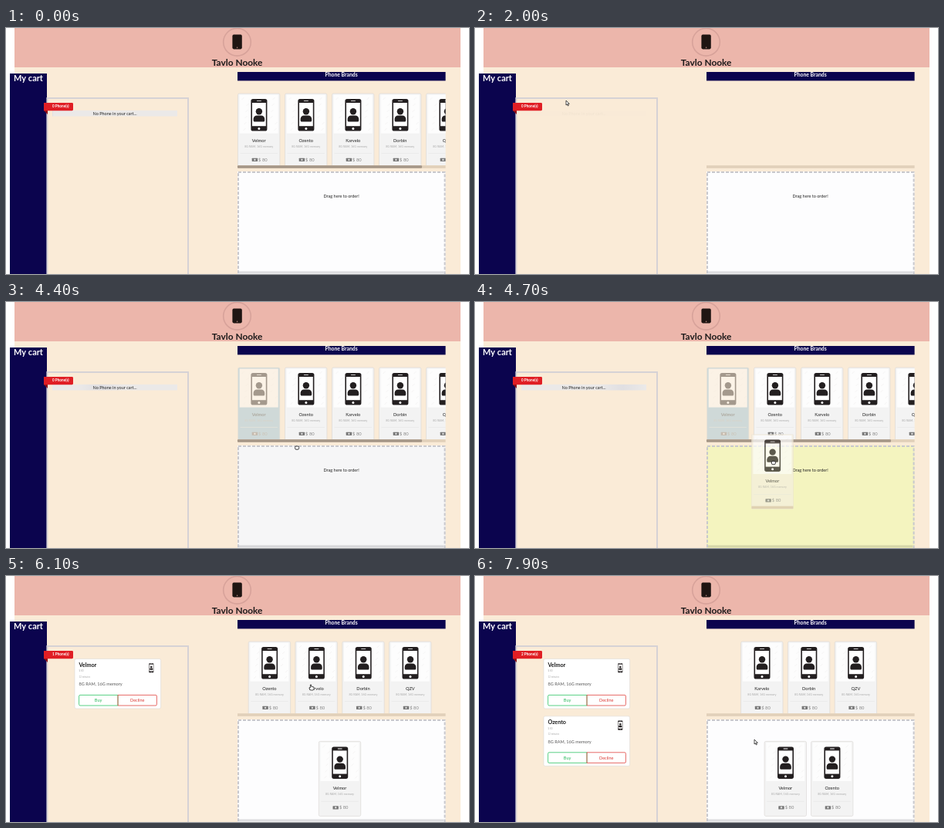
These frames come from a looping animation (600 px wide and 319 px high, 8 s). An HTML page with a canvas:

```html
<!DOCTYPE html>
<html lang="en">
<head>
<meta charset="utf-8">
<title>Phone cart</title>
<style>
html, body { margin: 0; width: 100%; height: 100%; overflow: hidden; background: #fff; }
canvas { display: block; width: 600px; height: 319px; }
</style>
</head>
<body>
<canvas id="stage"></canvas>
<script>
const W = 600, H = 319, LOOP = 8000, STEP = 100;
const NAVY = '#0b044e', BEIGE = '#faebd7', INK = '#231f20';
const BRANDS = ['Velmor', 'Ozento', 'Karvelo', 'Dorbin', 'QZV'];
const RELOAD = 1800, CART_IN = 1900, CARDS_IN = 2300;
const DRAGS = [
  { start: 4200, enter: 4350, drop: 5000, ghost: 4500, grab: [329, 122], left: 300.5 },
  { start: 6700, enter: 6900, drop: 7350, ghost: 6700, grab: [336, 112], left: 314 }
];
const FADE = 500;
const PATH = [
  [1400, 72, 40], [1900, 118, 94], [2300, 118, 94], [3200, 280, 112],
  [3900, 329, 122], [4200, 329, 122], [4400, 377, 189], [4900, 392, 219],
  [5600, 392, 219], [5800, 394, 200], [6100, 396, 144], [6500, 336, 112],
  [6700, 336, 112], [7200, 362, 212], [8000, 362, 212]
];

const canvas = document.getElementById('stage');
const ratio = window.devicePixelRatio || 1;
const layer = document.createElement('canvas');
for (const c of [canvas, layer]) {
  c.width = W * ratio;
  c.height = H * ratio;
  c.getContext('2d').scale(ratio, ratio);
}
let g = canvas.getContext('2d');

const clamp = v => Math.max(0, Math.min(1, v));
const mix = (a, b, p) => a + (b - a) * p;
const easeIn = p => clamp(p) ** 2;
const mixRgb = (a, b, p) => `rgb(${a.map((v, i) => Math.round(mix(v, b[i], p)))})`;

function rect(x, y, w, h, fill) {
  g.fillStyle = fill;
  g.fillRect(x, y, w, h);
}

function box(x, y, w, h, r, fill, stroke, width = 0.6) {
  g.beginPath();
  g.roundRect(x, y, w, h, r);
  if (fill) { g.fillStyle = fill; g.fill(); }
  if (stroke) { g.strokeStyle = stroke; g.lineWidth = width; g.stroke(); }
}

function disc(x, y, r, fill) {
  g.beginPath();
  g.arc(x, y, r, 0, Math.PI * 2);
  g.fillStyle = fill;
  g.fill();
}

function poly(points, fill, stroke) {
  g.beginPath();
  points.forEach(([x, y]) => g.lineTo(x, y));
  g.closePath();
  g.fillStyle = fill;
  g.fill();
  if (stroke) { g.strokeStyle = stroke; g.lineWidth = 0.8; g.stroke(); }
}

function text(str, x, y, size, fill, { bold = false, align = 'center' } = {}) {
  g.font = `${bold ? 'bold ' : ''}${size}px Lato, sans-serif`;
  g.textAlign = align;
  g.textBaseline = 'alphabetic';
  g.fillStyle = fill;
  g.fillText(str, x, y + size * 0.35);
}

// Draws a group as one flat image with a shared opacity.
function faded(alpha, draw) {
  if (alpha <= 0) return;
  if (alpha >= 1) return draw();
  const main = g;
  g = layer.getContext('2d');
  g.clearRect(0, 0, W, H);
  draw();
  g = main;
  g.save();
  g.globalAlpha = alpha;
  g.drawImage(layer, 0, 0, W, H);
  g.restore();
}

function clipped(x, y, w, h, draw) {
  g.save();
  g.beginPath();
  g.rect(x, y, w, h);
  g.clip();
  draw();
  g.restore();
}

function phone(x, y, s) {
  g.save();
  g.translate(x, y);
  g.scale(s, s);
  box(0, 0, 21, 41.5, 2.6, INK);
  rect(1.6, 5, 17.8, 30.2, '#fff');
  box(7.5, 2.2, 6, 0.9, 0.4, '#fff');
  disc(10.5, 38.4, 1.5, '#fff');
  disc(10.5, 16.2, 4.2, INK);
  box(3.2, 21.4, 14.6, 8, [4.5, 4.5, 1.5, 1.5], INK);
  g.restore();
}

function card(x, y, name, body = '#f3f3f3') {
  box(x, y, 54.4, 97, 1.8, body, '#d9d6d2');
  rect(x + 2.2, y + 1.6, 50, 50, '#fdfdfd');
  g.strokeStyle = '#f1f0f0';
  g.lineWidth = 0.7;
  g.beginPath();
  for (let i = 0; i < 12; i++) {
    const px = x + 5 + (i % 2) * 37 + (i * 3) % 7, py = y + 6 + Math.floor(i / 2) * 8;
    g.moveTo(px, py + 2);
    g.lineTo(px + 3, py - 1);
  }
  g.stroke();
  phone(x + 16.9, y + 7, 1);
  text(name, x + 27.2, y + 61, 5.7, '#222');
  text('8G RAM, 16G memory', x + 27.2, y + 68.3, 3.7, '#aaa');
  rect(x + 3, y + 77.5, 48.4, 0.5, '#e2e2e2');
  box(x + 18.2, y + 83.8, 7.4, 4.2, 0.5, '#777');
  disc(x + 21.9, y + 85.9, 1.2, '#ddd');
  text('$ 80', x + 26.6, y + 86, 5.8, '#868686', { align: 'left' });
}

function cartItem(y, name) {
  box(89, y, 111.6, 64.6, 2, '#fff', '#dcd8d4');
  text(name, 94.4, y + 7.8, 7.2, '#1c1c1c', { bold: true, align: 'left' });
  text('$ 80', 94.4, y + 16, 3, '#aaa', { align: 'left' });
  text('12 minutes', 94.4, y + 23.2, 3, '#aaa', { align: 'left' });
  text('8G RAM, 16G memory', 94.4, y + 33, 5.6, '#555', { align: 'left' });
  phone(185.2, y + 5.8, 0.29);
  box(94.6, y + 47, 50.4, 13.6, [1.5, 0, 0, 1.5], null, '#2fc465', 0.8);
  box(145, y + 47, 50.4, 13.6, [0, 1.5, 1.5, 0], null, '#e0453f', 0.8);
  text('Buy', 119.6, y + 53.8, 5.6, '#27b95a');
  text('Decline', 170.2, y + 53.8, 5.6, '#dc3b36');
}

function emptyNote(t, y) {
  const band = mix(-0.35, 1.05, (t % 1000) / 1000);
  const grad = g.createLinearGradient(60, 0, 222, 0);
  for (const [d, c] of [[0, '#ebe9e8'], [0.18, '#e0dfe2'], [0.36, '#ebe9e8']])
    grad.addColorStop(clamp(band + d), c);
  rect(60, y - 3.7, 162, 7.6, grad);
  text('No Phone in your cart...', 141, y, 5.5, '#222');
}

function header() {
  rect(11, 0, 578, H, BEIGE);
  rect(11, 0, 578, 51, '#ecb6ab');
  g.beginPath();
  g.arc(299.5, 18.3, 17.8, 0, Math.PI * 2);
  g.strokeStyle = '#d7a29a';
  g.lineWidth = 1.6;
  g.stroke();
  box(293.4, 8.6, 12.4, 18.8, 1.8, '#1f1512');
  disc(299.6, 25.4, 0.8, '#a87e77');
  text('Tavlo Nooke', 299.6, 45, 11.9, '#1d1a1a', { bold: true });
  rect(300, 57, 269.6, 11.4, NAVY);
  text('Phone Brands', 434.6, 60.8, 6.8, '#fff', { bold: true });
}

function cart(t, count) {
  rect(5, 59, 48, H - 59, NAVY);
  text('My cart', 29, 65.2, 11, '#fff', { bold: true });
  g.strokeStyle = '#d6d2d5';
  g.lineWidth = 2;
  g.strokeRect(53.4, 91, 182.6, 300);

  const first = DRAGS[0].drop;
  if (t < RELOAD) emptyNote(t, 110.6);
  else if (t < first) faded(easeIn((t - CART_IN) / FADE), () => emptyNote(t, 110.6));
  else if (t < first + FADE) faded(1 - easeIn((t - first) / FADE), () => emptyNote(t, 175.4));
  DRAGS.forEach((d, i) => {
    if (t >= d.drop) faded(easeIn((t - d.drop) / FADE), () => cartItem(107.4 + i * 74.4, BRANDS[i]));
  });

  poly([[49, 107], [54, 107], [54, 112]], '#8f1014');
  box(49, 97, 38, 10.2, [0, 1.4, 1.4, 0], '#e01e24');
  text(`${count} Phone(s)`, 70.8, 101.8, 4.7, '#fff', { bold: true });
}

function brandList(t) {
  const gone = DRAGS.filter(d => t >= d.drop + FADE).length;
  const names = BRANDS.slice(gone);
  const loaded = t < RELOAD || t >= CARDS_IN;
  const wide = names.length > 4;
  const pitch = wide ? 61 : 60.8;
  const left = wide ? 300.5 : 432.6 - (names.length * pitch - 6.4) / 2;
  const drag = DRAGS[gone];
  const shown = t < RELOAD ? 1 : easeIn((t - CARDS_IN) / FADE);

  if (loaded) clipped(299, 84, 270.6, 94, () => faded(shown, () => {
    names.forEach((name, i) => {
      const x = left + i * pitch;
      const held = i === 0 && drag && t >= drag.start;
      if (!held) return card(x, 85, name);
    });
  }));
  if (drag && t >= drag.start) clipped(299, 84, 270.6, 94, () => {
    const dropped = t >= drag.drop;
    const alpha = dropped ? 1 - easeIn((t - drag.drop) / FADE) : 0.4;
    faded(alpha, () => card(left, 85, names[0], dropped ? undefined : '#8fbfd9'));
  });

  rect(300, 178.2, 269.6, 3.6, '#e1d0ba');
  if (loaded && wide) box(300, 178.2, 239, 3.6, 1, '#a59788');
}

function zoneFill(t) {
  const white = [253, 253, 254], grey = [244, 244, 246], yellow = [244, 244, 191];
  const d = DRAGS.find(d => t >= d.enter && t < d.drop);
  if (!d) return mixRgb(white, white, 0);
  const p = (t - d.enter) / 60;
  return p < 1 ? mixRgb(white, grey, p) : mixRgb(grey, yellow, clamp((p - 1) / 4));
}

function dropZone(t, count) {
  rect(300, 186, 269.4, H - 186, zoneFill(t));
  rect(302, 315.4, 265.4, 3, 'rgba(0,0,20,0.13)');
  g.strokeStyle = '#c8c8cd';
  g.lineWidth = 2;
  g.setLineDash([4, 2]);
  g.strokeRect(301, 187, 267.6, 200);
  g.setLineDash([]);
  if (!count) text('Drag here to order!', 434.6, 218.4, 5.5, '#222');
  const left = 432.5 - (count * 60.4 - 6) / 2;
  for (let i = 0; i < count; i++) card(left + i * 60.4, 214.4, BRANDS[i]);
}

function cursorAt(t) {
  const i = PATH.findIndex(k => k[0] > t);
  const [t0, x0, y0] = PATH[i - 1], [t1, x1, y1] = PATH[i];
  const p = (t - t0) / (t1 - t0), e = p * p * (3 - 2 * p);
  return [mix(x0, x1, e), mix(y0, y1, e)];
}

function ghost(t, x, y) {
  const i = DRAGS.findIndex(d => t >= d.ghost && t < d.drop);
  if (i < 0) return;
  const d = DRAGS[i];
  const gx = x - d.grab[0] + d.left, gy = y - d.grab[1] + 85;
  faded(0.72, () => clipped(gx, gy, 54.4, 97, () => {
    rect(gx, gy, 54.4, 97, BEIGE);
    card(gx, gy, BRANDS[i], '#f5efe0');
    rect(gx, gy + 93.2, 54.4, 3.6, '#d9c5ae');
  }));
}

function cursor(t, x, y) {
  const dragging = DRAGS.some(d => t >= d.start && t < d.drop);
  const hand = (t >= 3700 && t < 4200) || (t >= 5900 && t < 6700);
  g.save();
  g.translate(x, y);
  if (dragging) {
    box(-2.4, -2, 5, 4.2, 1.5, '#fff', '#222', 0.9);
  } else if (hand) {
    poly([[-1.6, -3], [-0.5, -3], [-0.2, -0.6], [3, 0], [3, 2.5], [2, 4], [-1.6, 4], [-3.2, 1], [-1.6, 0.8]], '#fff', '#222');
  } else {
    poly([[0, 0], [0, 6], [1.4, 4.8], [2.4, 7], [3.3, 6.6], [2.4, 4.4], [4.3, 4.3]], '#fff', '#222');
  }
  g.restore();
}

function draw(t) {
  const count = DRAGS.filter(d => t >= d.drop).length;
  rect(0, 0, W, H, '#fff');
  header();
  cart(t, count);
  brandList(t);
  dropZone(t, count);
  if (t >= PATH[0][0]) {
    const [x, y] = cursorAt(t);
    ghost(t, x, y);
    cursor(t, x, y);
  }
}

const begin = performance.now();
function tick() {
  const t = (performance.now() - begin) % LOOP;
  draw(Math.floor(t / STEP) * STEP);
  requestAnimationFrame(tick);
}
tick();
</script>
</body>
</html>
```
